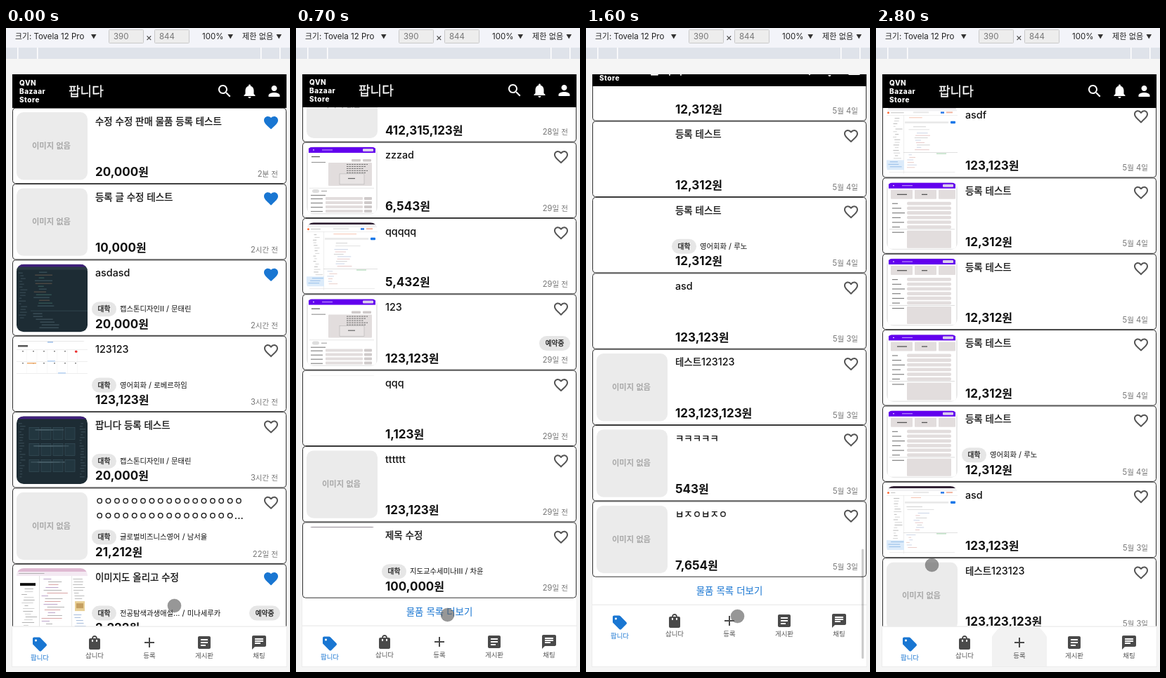
Recreate the animation shown at these times as an HTML page. Size 404 px wide and 918 px high, loop 2900 ms.

```html
<!DOCTYPE html>
<html lang="ko">
<head>
<meta charset="utf-8">
<style>
html, body { margin: 0; width: 404px; height: 918px; overflow: hidden; background: #f5f5f5; }
svg { display: block; font-family: Inter, 'Noto Sans CJK KR', sans-serif; }
text { white-space: pre; }
</style>
</head>
<body>
<script>
const LOOP = 2900, STEP = 100, PITCH = 108.35, THUMB_H = 96.5, BLUE = '#1976d2';

const icons = {
  search: 'M15.5 14h-.79l-.28-.27C15.41 12.59 16 11.11 16 9.5 16 5.91 13.09 3 9.5 3S3 5.91 3 9.5 5.91 16 9.5 16c1.61 0 3.09-.59 4.23-1.57l.27.28v.79l5 4.99L20.49 19l-4.99-5zm-6 0C7.01 14 5 11.99 5 9.5S7.01 5 9.5 5 14 7.01 14 9.5 11.99 14 9.5 14z',
  bell: 'M12 22c1.1 0 2-.9 2-2h-4c0 1.1.89 2 2 2zm6-6v-5c0-3.07-1.64-5.64-4.5-6.32V4c0-.83-.67-1.5-1.5-1.5s-1.5.67-1.5 1.5v.68C7.63 5.36 6 7.92 6 11v5l-2 2v1h16v-1l-2-2z',
  person: 'M12 12c2.21 0 4-1.79 4-4s-1.79-4-4-4-4 1.79-4 4 1.79 4 4 4zm0 2c-2.67 0-8 1.34-8 4v2h16v-2c0-2.66-5.33-4-8-4z',
  heart: 'M12 21.35l-1.45-1.32C5.4 15.36 2 12.28 2 8.5 2 5.42 4.42 3 7.5 3c1.74 0 3.41.81 4.5 2.09C13.09 3.81 14.76 3 16.5 3 19.58 3 22 5.42 22 8.5c0 3.78-3.4 6.86-8.55 11.54z',
  outline: 'M16.5 3c-1.74 0-3.41.81-4.5 2.09C10.91 3.81 9.24 3 7.5 3 4.42 3 2 5.42 2 8.5c0 3.78 3.4 6.86 8.55 11.54L12 21.35l1.45-1.32C18.6 15.36 22 12.28 22 8.5 22 5.42 19.58 3 16.5 3zm-4.4 15.55l-.1.1-.1-.1C7.14 14.24 4 11.39 4 8.5 4 6.5 5.5 5 7.5 5c1.54 0 3.04.99 3.57 2.36h1.87C13.46 5.99 14.96 5 16.5 5c2 0 3.5 1.5 3.5 3.5 0 2.89-3.14 5.74-7.9 10.05z',
  tag: 'M21.41 11.41l-8.83-8.83c-.37-.37-.88-.58-1.41-.58H4c-1.1 0-2 .9-2 2v7.17c0 .53.21 1.04.59 1.41l8.83 8.83c.78.78 2.05.78 2.83 0l7.17-7.17c.78-.78.78-2.04-.01-2.83zM6.5 8C5.67 8 5 7.33 5 6.5S5.67 5 6.5 5 8 5.67 8 6.5 7.33 8 6.5 8z',
  bag: 'M18 6h-2c0-2.21-1.79-4-4-4S8 3.79 8 6H6c-1.1 0-2 .9-2 2v12c0 1.1.9 2 2 2h12c1.1 0 2-.9 2-2V8c0-1.1-.9-2-2-2zm-8 4c0 .55-.45 1-1 1s-1-.45-1-1V8h2v2zm2-6c1.1 0 2 .9 2 2h-4c0-1.1.9-2 2-2zm4 6c0 .55-.45 1-1 1s-1-.45-1-1V8h2v2z',
  add: 'M19 13h-6v6h-2v-6H5v-2h6V5h2v6h6v2z',
  article: 'M19 3H5c-1.1 0-2 .9-2 2v14c0 1.1.9 2 2 2h14c1.1 0 2-.9 2-2V5c0-1.1-.9-2-2-2zm-5 14H7v-2h7v2zm3-4H7v-2h10v2zm0-4H7V7h10v2z',
  chat: 'M20 2H4c-1.1 0-1.99.9-1.99 2L2 22l4-4h14c1.1 0 2-.9 2-2V4c0-1.1-.9-2-2-2zM6 9h12v2H6V9zm8 5H6v-2h8v2zm4-6H6V6h12v2z'
};

// title, price, age, picture, load time, liked, course, reserved
const items = [
  ['수정 수정 판매 물품 등록 테스트', '20,000', '2분 전', 'none', 0, 1],
  ['등록 글 수정 테스트', '10,000', '2시간 전', 'none', 0, 1],
  ['asdasd', '20,000', '2시간 전', 'code', -200, 1, '캡스톤디자인II / 문태린'],
  ['123123', '123,123', '3시간 전', 'calendar', -100, 0, '영어회화 / 로베르하임'],
  ['팝니다 등록 테스트', '20,000', '3시간 전', 'diagram', -200, 0, '캡스톤디자인II / 문태린'],
  ['ㅇ'.repeat(17) + '\n' + 'ㅇ'.repeat(16) + '...', '21,212', '22일 전', 'none', 0, 0, '글로벌비즈니스영어 / 남서율'],
  ['이미지도 올리고 수정', '2,222', '26일 전', 'page', -200, 1, '전공탐색과생애설... / 미나세루카', 1],
  ['테스트', '12,000', '26일 전', 'none', 0],
  ['123', '1,234', '27일 전', 'app', 0],
  ['432', '12,321', '27일 전', 'app', 0],
  ['123123', '123,123,123', '27일 전', 'app', 240, 1],
  ['물품 수정', '9,999', '27일 전', 'app', 50, 0, '영어회화 / 빈슬로', 1],
  ['ㅁㄴㄹ', '351,345', '28일 전', 'calendar', 298],
  ['123123123123', '412,315,123', '28일 전', 'none', 0],
  ['zzzad', '6,543', '29일 전', 'editor', 50],
  ['qqqqq', '5,432', '29일 전', 'app', 350],
  ['123', '123,123', '29일 전', 'editor', 350, 0, '', 1],
  ['qqq', '1,123', '29일 전', 'calendar', 697],
  ['tttttt', '123,123', '29일 전', 'none', 0],
  ['제목 수정', '100,000', '29일 전', 'app', 698, 0, '지도교수세미나III / 차윤'],
  ...Array.from({ length: 6 }, () => ['테스트', '9,999', '5월 5일', 'app', 2500]),
  ['테스트', '9,999', '5월 5일', 'app', 2500, 0, '영어회화 / 올리버하츠', 1],
  ['zzz', '5,123', '5월 4일', 'app', 2500],
  ['hegrszd', '12,343', '5월 4일', 'app', 2500],
  ['hegrszd', '12,343', '5월 4일', 'app', 2500],
  ['asdf', '123,123', '5월 4일', 'app', 2500],
  ['asdf', '123,123', '5월 4일', 'app', 2450],
  ['등록 테스트', '12,312', '5월 4일', 'form', 2150],
  ['등록 테스트', '12,312', '5월 4일', 'form', 2100],
  ['등록 테스트', '12,312', '5월 4일', 'form', 1990],
  ['등록 테스트', '12,312', '5월 4일', 'form', 2050, 0, '영어회화 / 루노'],
  ['asd', '123,123', '5월 3일', 'app', 2150],
  ['테스트123123', '123,123,123', '5월 3일', 'none', 0],
  ['ㅋㅋㅋㅋㅋ', '543', '5월 3일', 'none', 0],
  ['ㅂㅈㅇㅂㅈㅇ', '7,654', '5월 3일', 'none', 0]
];

// time, value(s)
const scrollKeys = [[0, 0], [100, 220], [300, 991], [400, 1330], [500, 1492], [600, 1473], [700, 1468], [800, 1467],
  [900, 1467], [1000, 1640], [1200, 2520], [1300, 2833], [1500, 3610], [1600, 3665], [1700, 3643], [1800, 3636],
  [1900, 3634], [2000, 3634], [2200, 3500], [2400, 3367.5]];
const cursorKeys = [[0, 239, 823], [100, 239, 640], [200, 239, 823], [300, 239, 745], [400, 239, 600], [500, 230, 760],
  [700, 215, 836], [900, 215, 836], [1000, 215, 700], [1100, 215, 838], [1200, 215, 650], [1300, 215, 838],
  [1400, 215, 650], [1500, 215, 838], [2000, 215, 838], [2100, 215, 640], [2400, 215, 800], [2600, 204, 908], [2800, 79, 765]];

let seed = 1;
const random = () => (seed = seed * 16807 % 2147483647) / 2147483647;

const box = (x, y, w, h, fill, rx = 0, extra = '') =>
  `<rect x="${x}" y="${y}" width="${w}" height="${h}" rx="${rx}" fill="${fill}" ${extra}/>`;

// Hangul is set slightly smaller than Latin; medium weight is drawn with a hairline stroke.
function text(x, y, str, size, weight = 400, fill = '#111', anchor = 'start', extra = '') {
  const medium = weight === 500 ? `stroke="${fill}" stroke-width=".3"` : '';
  const runs = str.replace(/[ㄱ-힣]+/g, run => `<tspan font-size="${size * .94}" ${medium}>${run}</tspan>`);
  return `<text x="${x}" y="${y}" font-size="${size}" font-weight="${weight}" fill="${fill}" text-anchor="${anchor}" ${extra}>${runs}</text>`;
}
const icon = (name, x, y, fill) => `<path d="${icons[name]}" transform="translate(${x} ${y})" fill="${fill}"/>`;
const repeat = (n, fn) => Array.from({ length: n }, (_, i) => fn(i)).join('');
const lines = (x, y, w, n, gap, ...fills) => repeat(n, i =>
  box(x + random() * w * .25, y + i * gap, w * (.2 + .55 * random()), .9, fills[i % fills.length]));

const GREY = '#e2dddd';
const purpleTop = () => box(0, 0, 101, 97, '#e8e8e8') + box(2, 1, 97, 94, '#fff', 4) + box(3, 1, 95, 8, '#6200ee') +
  box(9, 4.5, 2, 1, '#fff') + box(22, 4.5, 15, 1, '#c9a8ff') + box(80, 3, 15, 4, '#d9cdec', 1);

const art = {
  none: () => box(0, 0, 101, 97, '#ebebeb') + text(49.5, 52, '이미지 없음', 12.1, 700, '#a9a9a9', 'middle'),
  code: () => box(0, 0, 101, 97, '#1d2c34') + box(0, 0, 101, 4, '#40207c') + box(0, 4, 101, 4, '#2a3a43') +
    lines(3, 12, 14, 17, 4, '#40545e') + lines(24, 11, 34, 13, 4, '#47606a', '#6b5a4c', '#3f6b66') +
    box(20, 66, 81, 1, '#30444e') + lines(22, 70, 56, 6, 4, '#4c626c'),
  diagram: () => box(0, 0, 101, 97, '#1d2c34') + box(0, 0, 101, 4, '#40207c') +
    lines(3, 10, 11, 20, 4, '#40545e') + lines(89, 10, 11, 20, 4, '#40545e') +
    repeat(12, i => box(18 + i % 4 * 17, 16 + (i >> 2) * 23, 14, 17, '#22363f', 0, 'stroke="#3b535d" stroke-width=".6"') +
      lines(19, 19 + (i >> 2) * 23, 70, 1, 4, '#4c646e')),
  calendar: () => box(0, 0, 101, 97, '#fff') + box(0, 1, 101, .7, '#ddd') + box(2, 7, 14, 2.5, '#555') + box(44, 2, 8, 1.5, '#9bbce8') +
    repeat(5, i => box(0, 13 + i * 17, 101, .5, '#ddd') + repeat(6, j => box(8 + j * 15, 15 + i * 17, 2, 1.5, '#888'))) +
    repeat(6, i => box(14.4 * (i + 1), 13, .4, 80, '#eee')) +
    box(83, 14.5, 3.5, 3.5, '#e33', 2) + box(15, 32, 13, 1.5, '#f0ac6a') + box(44, 29, 11, 1.5, '#b6d2f4') + box(59, 46, 11, 1.5, '#b6d2f4'),
  page: () => box(0, 0, 101, 97, '#fff') + box(0, 0, 101, 5, '#dfb9d2') + box(0, 5, 101, 6, '#f3e9f2') + lines(3, 7, 80, 1, 2, '#aaa') +
    box(5, 21, 22, 4, '#111') + lines(7, 29, 24, 16, 4, '#aaa', '#ccc') + box(32, 11, .6, 86, '#ccc') +
    lines(35, 15, 42, 20, 4, '#b59ac4', '#aaa', '#d49a9a') + box(78, 11, .6, 86, '#ddd') + lines(80, 15, 22, 8, 4, '#b5b5b5') +
    box(83, 47, 14, 14, '#e8cf95') + box(85, 50, 10, 7, '#c59f60') + lines(80, 66, 22, 7, 4, '#9cb5d8'),
  app: () => box(0, 0, 101, 97, '#fff') + box(0, 0, 101, 3, '#2c1c2f') + box(0, 3, 101, 4, '#f1f1f3') + box(1, 8, 3, 3, '#ff6c37', 2) +
    lines(6, 9, 25, 1, 2, '#bbb') + box(38, 8, 22, 2, '#e8e8e8') + box(77, 8, 5, 2.5, '#2979e8') + box(85, 8, 9, 2, '#f2b5a0') +
    box(0, 13, 101, .5, '#ddd') + box(24, 13, .5, 84, '#ddd') + lines(9, 17, 15, 16, 3.8, '#b5b5b5', '#d0d0d0') +
    lines(27, 16, 50, 1, 2, '#f5bda8') + box(26, 22, 62, 2.5, '#e8e8e8') + box(91, 21.5, 7, 3.5, '#1677e8', 1) +
    lines(27, 29, 60, 2, 4, '#ccc', '#ddd') + lines(38, 38, 28, 8, 3.4, '#c3cee4', '#e5c3c3', '#ccc') +
    box(24, 66, 77, .6, '#ccc') + lines(28, 69, 18, 6, 3.6, '#c9d2e4', '#e8c9c3') + box(71, 67, 14, 1.5, '#bfe0c5') +
    box(0, 77, 25, 14, '#dcebfa') + lines(2, 79, 25, 3, 3.5, '#8fb9e6') + box(0, 94, 101, .6, '#ddd'),
  editor: () => purpleTop() + box(7, 14, 12, 1.2, '#555') + box(7, 22, 20, 1.2, '#999') + box(64, 18, 13, 3.5, '#cfcaca', 1) +
    box(80, 18, 12, 3.5, '#cfcaca', 1) + box(31, 23, 62, 33, GREY, 1) +
    repeat(5, i => `<path d="M57 ${25.5 + i * 3}h${30 - i % 3 * 3}" stroke="#666" stroke-dasharray="2.5 1"/>`) +
    box(47, 39, 35, 15, '#e8e4e4', 0, 'stroke="#aaa" stroke-width=".5"') + box(59, 45, 10, 1.2, '#666') +
    box(4, 59, 92, .5, '#ccc') + box(8, 61, 10, 5, '#ddd', 3) + box(21, 63, 8, 1.2, '#aaa') + box(6, 69, 21, 1.2, '#888') +
    repeat(4, i => box(6, 74 + i * 6, 17, 1.2, '#888') + box(27, 72 + i * 6, 53, 4, GREY, 1) + box(82, 72 + i * 6, 11, 4, '#cfcaca', 1)),
  form: () => purpleTop() + repeat(3, i => box(6 + i * 34, 11, i < 2 ? 31 : 24, 13, GREY, 1)) +
    box(15, 17, 14, 1.3, '#555') + box(50, 17, 8, 1.3, '#555') +
    repeat(6, i => box(8, 30 + i * 6.7, 8 + i * 5 % 11, 1.1, '#777') + box(29, 28 + i * 6.7, 63, 4.8, GREY, 2)) +
    box(4, 67, 93, .5, '#bbb') + box(8, 71, 17, 1.1, '#777') + box(29, 69, 63, 25, GREY, 1)
};

const chip = (x, w, label) => box(x, 59.5, w, 21, '#e6e6e6', 10.5) + text(x + w / 2, 73.6, label, 10.3, 500, '#222', 'middle');

function card([title, price, age, picture, , liked, course, reserved], i) {
  seed = 71 + i * 137;
  return `<g transform="translate(0 ${i * PITCH})">` +
    box(9.5, .2, 389, 107.4, '#fff', 4, 'stroke="#333"') +
    `<svg class="thumb" x="15" y="6" width="101" height="${THUMB_H}"><g clip-path="url(#round)">${art[picture]()}</g></svg>` +
    title.split('\n').map((row, k) => text(127, 23.5 + k * 21, row, 14.3, 500)).join('') +
    text(127, 97, price + '원', 17, 700) +
    text(387, 97.8, age, 11.2, 400, '#777', 'end') +
    icon(liked ? 'heart' : 'outline', 365, 9, liked ? BLUE : '#555') +
    (course ? chip(122, 35, '대학') + text(162, 73.6, course, 11) : '') +
    (reserved ? chip(346, 44, '예약중') : '') + '</g>';
}

const arrow = x => `<path d="M${x} 9h7.5l-3.75 6.5z" fill="#333"/>`;
const field = (x, value) => box(x + .5, 2.5, 49, 19, '#ededed', 1, 'stroke="#c9c9c9"') + text(x + 7, 16, value, 11.5, 400, '#777');
const toolbar = box(0, 0, 404, 28, '#f3f4f9') + text(13, 16, '크기: Tovela 12 Pro', 11.5, 400, '#222') + arrow(121) +
  field(146, '390') + text(203.5, 18, '×', 14, 400, '#444', 'middle') + field(211, '844') +
  text(279, 16, '100%', 11.5, 400, '#222') + arrow(315.5) + text(336, 16, '제한 없음', 11.8, 400, '#222') + arrow(384.5) +
  box(0, 28, 404, 16, '#dfe3ea') + [16, 44, 362, 389].map(x => box(x, 28, 1.5, 16, '#fff')).join('');

const header = box(9, 66, 390, 48, '#000') +
  ['QVN', 'Bazaar', 'Store'].map((word, i) => text(19, 82 + i * 12, word, 10, 800, '#fff', 'start', 'letter-spacing=".5"')).join('') +
  text(89, 97, '팝니다', 19.2, 500, '#fff') +
  icon('search', 299, 78, '#fff') + icon('bell', 334.5, 78, '#fff') + icon('person', 369.5, 78, '#fff');

const tabs = [['tag', '팝니다'], ['bag', '삽니다'], ['add', '등록'], ['article', '게시판'], ['chat', '채팅']];
const nav = box(9, 852.5, 390, 1.5, '#eee') + box(9, 854, 390, 90, '#fff') +
  '<svg x="165" y="854" width="78" height="56"><circle id="ripple" cx="39" cy="36" fill="#f2f2f2"/></svg>' +
  tabs.map(([name, label], i) => {
    const x = 48 + i * 78, y = i ? 864 : 866.5, fill = i ? '#4a4a4a' : BLUE;
    return icon(name, x - 12, y, fill) + text(x, y + 34, label, 10.1, 400, i ? '#555' : BLUE, 'middle');
  }).join('');

document.body.innerHTML = `<svg width="404" height="918">
  <clipPath id="round"><rect width="101" height="${THUMB_H}" rx="10"/></clipPath>
  ${toolbar}${box(8.5, 65.5, 391, 845, '#fff', 0, 'stroke="#ececec"')}
  <svg x="9" y="66" width="390" height="844" viewBox="9 66 390 844">
    <g id="screen">
      <g id="list">${items.slice(0, 20).map(card).join('')}
        <g id="extra">${items.slice(20).map((item, i) => card(item, i + 20)).join('')}</g>
        <g id="more">${text(204, 24, '물품 목록 더보기', 14.3, 400, BLUE, 'middle')}</g>
      </g>${header}${nav}
    </g>
    <rect id="bar" x="392" width="3.2" rx="1.6" fill="#000" fill-opacity=".2"/>
  </svg>
  <circle id="cursor" r="9.5" fill="#5a5a5a" fill-opacity=".63" stroke="#666" stroke-opacity=".35"/>
</svg>`;

const el = id => document.getElementById(id);
const thumbs = document.querySelectorAll('.thumb');
const set = (id, attrs) => Object.entries(attrs).forEach(([key, value]) => el(id).setAttribute(key, value));
const clamp = v => Math.max(0, Math.min(1, v));

function track(keys, t) {
  const next = keys.findIndex(key => key[0] > t);
  if (next < 0) return keys[keys.length - 1].slice(1);
  const a = keys[next - 1], b = keys[next], p = (t - a[0]) / (b[0] - a[0]);
  return a.slice(1).map((v, i) => v + (b[i + 1] - v) * p);
}

function draw() {
  const t = Math.floor(performance.now() % LOOP / STEP) * STEP;
  const count = t < 900 ? 20 : 40;
  const [scroll] = track(scrollKeys, t), [x, y] = track(cursorKeys, t);
  const limit = count * PITCH - 700, top = Math.min(scroll, limit);
  const total = limit + 844;
  const scrolling = t > 0 && t < 700 || t >= 1000 && t < 1900 || t > 2000 && t < 2500;

  set('screen', { transform: `translate(0 ${top - scroll})` });
  set('list', { transform: `translate(0 ${114 - top})` });
  set('extra', { display: count > 20 ? 'inline' : 'none' });
  set('more', { transform: `translate(0 ${count * PITCH})` });
  set('bar', { y: 68 + top / total * 831, height: 844 / total * 831, opacity: scrolling ? 1 : 0 });
  set('ripple', { r: 45 * clamp((t - 2500) / 300) });
  set('cursor', { cx: x + .5, cy: y + .5 });
  items.forEach((item, i) => {
    const shown = item[3] === 'none' ? 1 : clamp((t - item[4]) / 200);
    thumbs[i].setAttribute('height', THUMB_H * shown);
  });
  requestAnimationFrame(draw);
}
draw();
</script>
</body>
</html>
```
